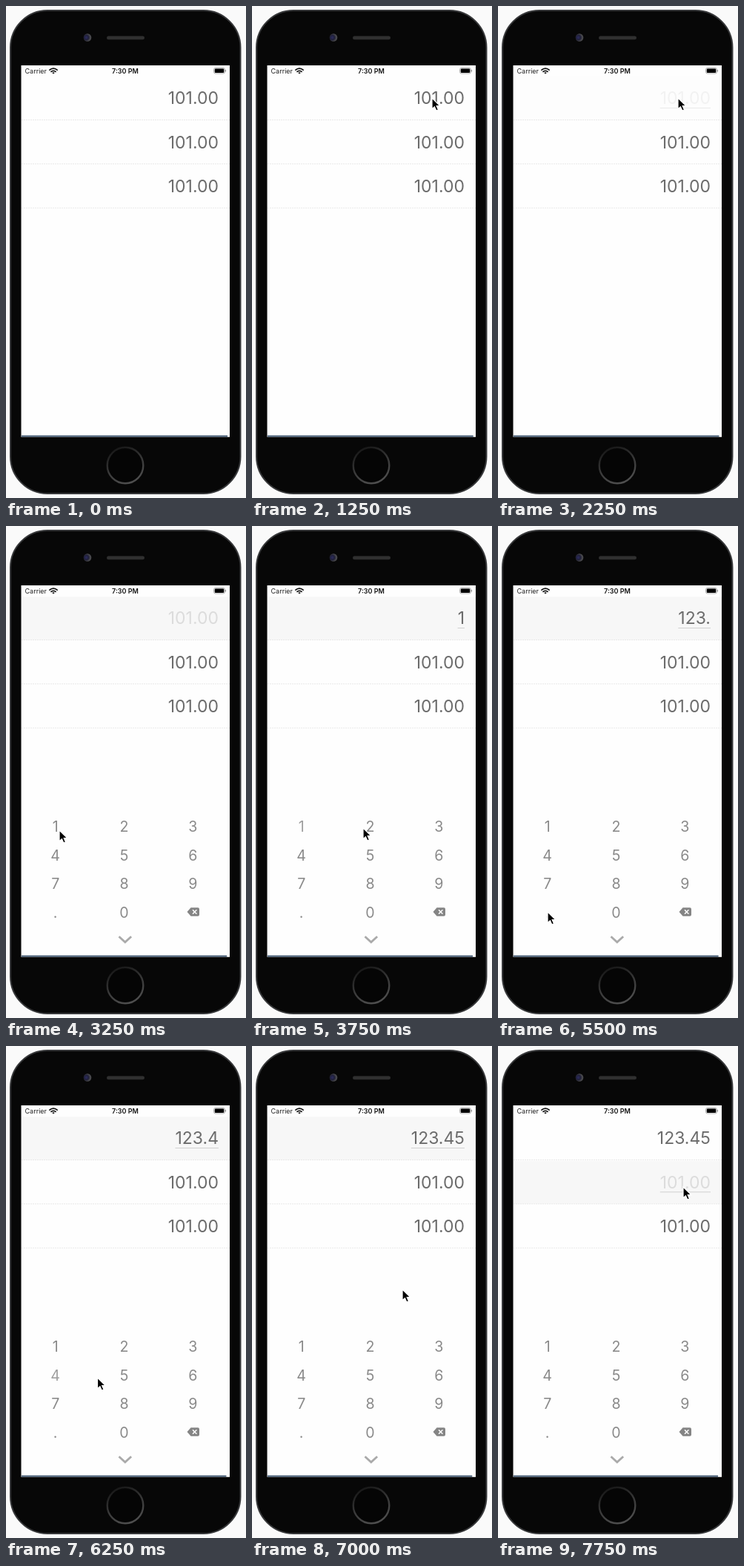
An HTML page for the animation above (8 s loop, 324 by 663 pixels).

```html
<!DOCTYPE html>
<html lang="en">
<head>
<meta charset="utf-8">
<title>Keypad entry</title>
<style>
html, body { margin: 0; width: 100%; height: 100%; overflow: hidden; background: #fafafa; }
svg { display: block; width: 324px; height: 663px; font-family: Inter, Roboto, sans-serif; }
.value { font-size: 23px; text-anchor: end; fill: #6c6c6c; }
.key { font-size: 19.6px; text-anchor: middle; fill: #8a8a8a; }
</style>
</head>
<body>
<svg viewBox="0 0 324 663">
  <defs>
    <linearGradient id="ring" x1=".3" y1="0" x2=".7" y2="1">
      <stop offset="0" stop-color="#181818"/>
      <stop offset=".5" stop-color="#383838"/>
      <stop offset="1" stop-color="#505050"/>
    </linearGradient>
    <radialGradient id="lens" cx=".35" cy=".5">
      <stop offset="0" stop-color="#2c2c62"/>
      <stop offset=".6" stop-color="#202038"/>
      <stop offset="1" stop-color="#48484c"/>
    </radialGradient>
  </defs>

  <!-- phone -->
  <rect x="6" y="6" width="310.5" height="651" rx="50" fill="#070707" stroke="#37383a" stroke-width="2"/>
  <circle cx="110" cy="42.5" r="5.3" fill="url(#lens)"/>
  <rect x="136" y="40.5" width="51" height="4.8" rx="2.4" fill="#303030"/>
  <circle cx="161" cy="619" r="24.3" fill="#050505" stroke="url(#ring)" stroke-width="2.4"/>
  <rect x="20.5" y="80" width="281.5" height="500.8" fill="#fefefe"/>

  <!-- status bar -->
  <text x="25.5" y="91" font-size="9" fill="#222">Carrier</text>
  <text x="161" y="91" font-size="9" font-weight="600" text-anchor="middle" fill="#111">7:30 PM</text>
  <g fill="none" stroke="#111" stroke-width="1.7">
    <path d="M58.3 86.6Q64 81.6 69.7 86.6M60.4 88.8Q64 85.8 67.6 88.8"/>
    <path d="M62.2 89.9Q64 88.6 65.8 89.9L64 91.6Z" fill="#111" stroke="none"/>
  </g>
  <rect x="280.5" y="83.5" width="15" height="7.5" rx="2.2" fill="none" stroke="#999" stroke-width=".8"/>
  <rect x="281.7" y="84.6" width="12.6" height="5.3" rx="1.2" fill="#000"/>
  <path d="M296.6 86v2.6" stroke="#999"/>

  <g id="rows"></g>
  <g id="pad">
    <g id="keys"></g>
    <path d="M244.5 520L249.5 514.2H259Q261 514.2 261 516.2V523.8Q261 525.8 259 525.8H249.5Z" fill="#858585"/>
    <path d="M252 517.2l5.4 5.6m0-5.6l-5.4 5.6" stroke="#fff" stroke-width="1.5"/>
    <path d="M152.5 553.2l8.3 7.7 8.3-7.7" fill="none" stroke="#aaa" stroke-width="2.8"/>
  </g>
  <path id="bar" stroke="#2b4460" stroke-width="1.8"/>
  <path id="cursor" d="M0 0V14.8L3.4 11.8 5.8 17 8.5 15.9 6.2 10.7H10.7Z" fill="#000" stroke="#fff" stroke-width="1.2"/>
</svg>
<script>
const $ = id => document.getElementById(id);
const STEP = 250, LOOP = 8000;

function add(parent, tag, attrs, text = '') {
  const el = document.createElementNS('http://www.w3.org/2000/svg', tag);
  for (const name in attrs) el.setAttribute(name, attrs[name]);
  el.textContent = text;
  return parent.appendChild(el);
}

const rows = [0, 1, 2].map(i => {
  const y = 95.5 + i * 59.3, g = $('rows');
  const back = add(g, 'rect', { x: 21, y, width: 281, height: 58, fill: '#f7f7f7' });
  add(g, 'path', { d: `M21 ${y + 58}H302`, stroke: '#e8e8e8', 'stroke-dasharray': '2 1' });
  const value = add(g, 'text', { class: 'value', x: 287, y: y + 36.8 }, '101.00');
  const line = add(g, 'path', { stroke: '#d0d0d0' });
  return { y, back, value, line };
});

const keys = {};
[...'123456789.0'].forEach((k, i) => {
  keys[k] = add($('keys'), 'text', {
    class: 'key', x: 66.7 + i % 3 * 92.8, y: 412 + Math.floor(i / 3) * 38.5
  }, k);
});

// [step, x, y]
const path = [
  [2, 120, 250], [4, 215, 160], [5, 243, 124], [10, 243, 124], [12, 72, 410],
  [13, 72, 410], [14, 70, 409], [15, 150, 407], [16, 158, 409], [18, 250, 408],
  [19, 169, 471], [20, 95, 511], [21, 67, 520], [22, 67, 520], [24, 70, 448],
  [25, 123.5, 447], [26, 160, 446], [27, 162, 446], [29, 244, 210], [30, 250, 190], [32, 250, 190]
];
const presses = [['1', 14], ['2', 16], ['3', 19], ['.', 22], ['4', 24], ['5', 26]];
const FIRST_TAP = 9, SECOND_TAP = 30;

function cursorAt(step) {
  const i = path.findIndex(p => p[0] > step);
  const [s0, x0, y0] = path[i - 1], [s1, x1, y1] = path[i];
  const f = (step - s0) / (s1 - s0);
  return [x0 + (x1 - x0) * f, y0 + (y1 - y0) * f];
}

function draw(step) {
  const typed = presses.filter(p => p[1] <= step).map(p => p[0]).join('');
  const active = step >= SECOND_TAP ? 1 : step >= FIRST_TAP ? 0 : -1;
  rows.forEach(({ y, back, value, line }, i) => {
    const on = i === active;
    const age = step - (i ? SECOND_TAP : FIRST_TAP);
    const fresh = on && (i || !typed);
    value.textContent = i === 0 && typed ? typed : '101.00';
    value.style.fill = !fresh ? '' : age === 0 ? '#f2f2f2' : '#dcdcdc';
    back.setAttribute('opacity', !on ? 0 : age === 0 ? .15 : 1);
    const blinkOff = step === 12 || step === 13;
    line.setAttribute('opacity', !on || blinkOff ? 0 : age === 0 ? .4 : 1);
    line.setAttribute('d', `M${287 - value.getComputedTextLength()} ${y + 42}H287`);
  });

  $('pad').setAttribute('opacity', Math.max(0, Math.min(1, (step - FIRST_TAP) / 2)));
  for (const [k, at] of presses)
    keys[k].setAttribute('opacity', [.25, .82][step - at] ?? 1);

  $('bar').setAttribute('d', `M21 579.7H${299 - step / 16}`);
  $('cursor').setAttribute('visibility', step < path[0][0] ? 'hidden' : 'visible');
  if (step >= path[0][0])
    $('cursor').setAttribute('transform', `translate(${cursorAt(step)})`);
}

const start = performance.now();
function tick() {
  draw(Math.floor((performance.now() - start) % LOOP / STEP));
  requestAnimationFrame(tick);
}
tick();
</script>
</body>
</html>
```
